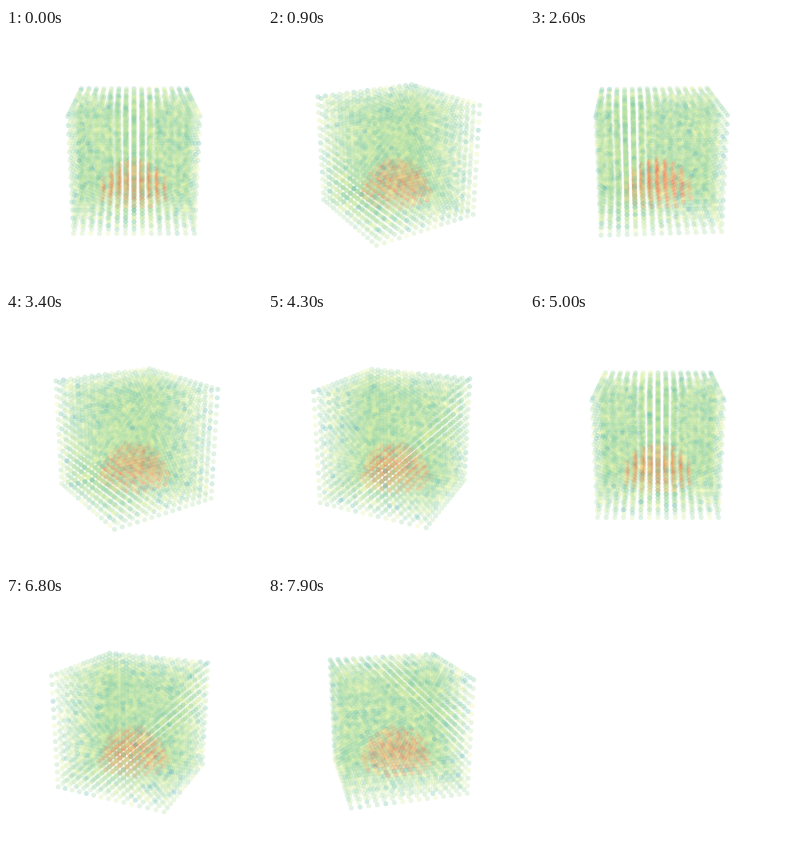
A matplotlib script for the animation above (8000 ms loop, 256 px wide and 256 px high).

```python
import numpy as np
import matplotlib.pyplot as plt
from matplotlib.animation import FuncAnimation

SIZE = 256
FRAMES, INTERVAL = 80, 100
STEP = np.radians(3.6)      # turn per frame
N = 15                      # grid points per side
HALF = N // 2
DIST, ELEV = 8.5, np.radians(20)
FOCAL = SIZE / 2 / np.tan(np.radians(15))
DOT = 5                     # dot diameter in pixels
ALPHA = 0.3

# Cubic grid with a hot dome above the floor
axis = np.arange(-HALF, HALF + 1)
gx, gy, gz = (g.ravel() for g in np.meshgrid(axis, axis, axis, indexing="ij"))
rng = np.random.default_rng(4)
value = rng.normal(0.31, 0.055, gx.size)
height = gz + 5
dome = (height >= 0) & (gx**2 + gy**2 + height**2 <= 20)
value[dome] = rng.normal(0.76, 0.035, dome.sum())
value[(gx == -3) & (gy == 0) & (gz == -4)] = 0.93

colors = plt.get_cmap("Spectral_r")(np.clip(value, 0.15, 1))
colors[:, 3] = ALPHA
x, y, z = gx / HALF, gy / HALF, gz / HALF


def project(angle):
    """Return screen positions and depths for a turn about the vertical axis."""
    near = x * np.cos(angle) - y * np.sin(angle)
    side = x * np.sin(angle) + y * np.cos(angle)
    c, s = np.cos(ELEV), np.sin(ELEV)
    depth = DIST - near * c - z * s
    up = z * c - near * s
    scale = FOCAL / depth
    pos = np.column_stack([SIZE / 2 + side * scale, SIZE / 2 - up * scale])
    return pos, depth


fig = plt.figure(figsize=(4, 4), dpi=SIZE / 4, facecolor="white")
ax = fig.add_axes([0, 0, 1, 1])
ax.set(xlim=(0, SIZE), ylim=(SIZE, 0))
ax.axis("off")
dots = ax.scatter(x, y, s=(DOT * 72 / fig.dpi) ** 2, c=colors, linewidths=0)


def draw(i):
    pos, depth = project(i * STEP)
    order = np.argsort(-depth, kind="stable")
    dots.set_offsets(pos[order])
    dots.set_facecolors(colors[order])
    return (dots,)


anim = FuncAnimation(fig, draw, frames=FRAMES, interval=INTERVAL,
                     repeat=True, repeat_delay=0)
plt.show()
```
